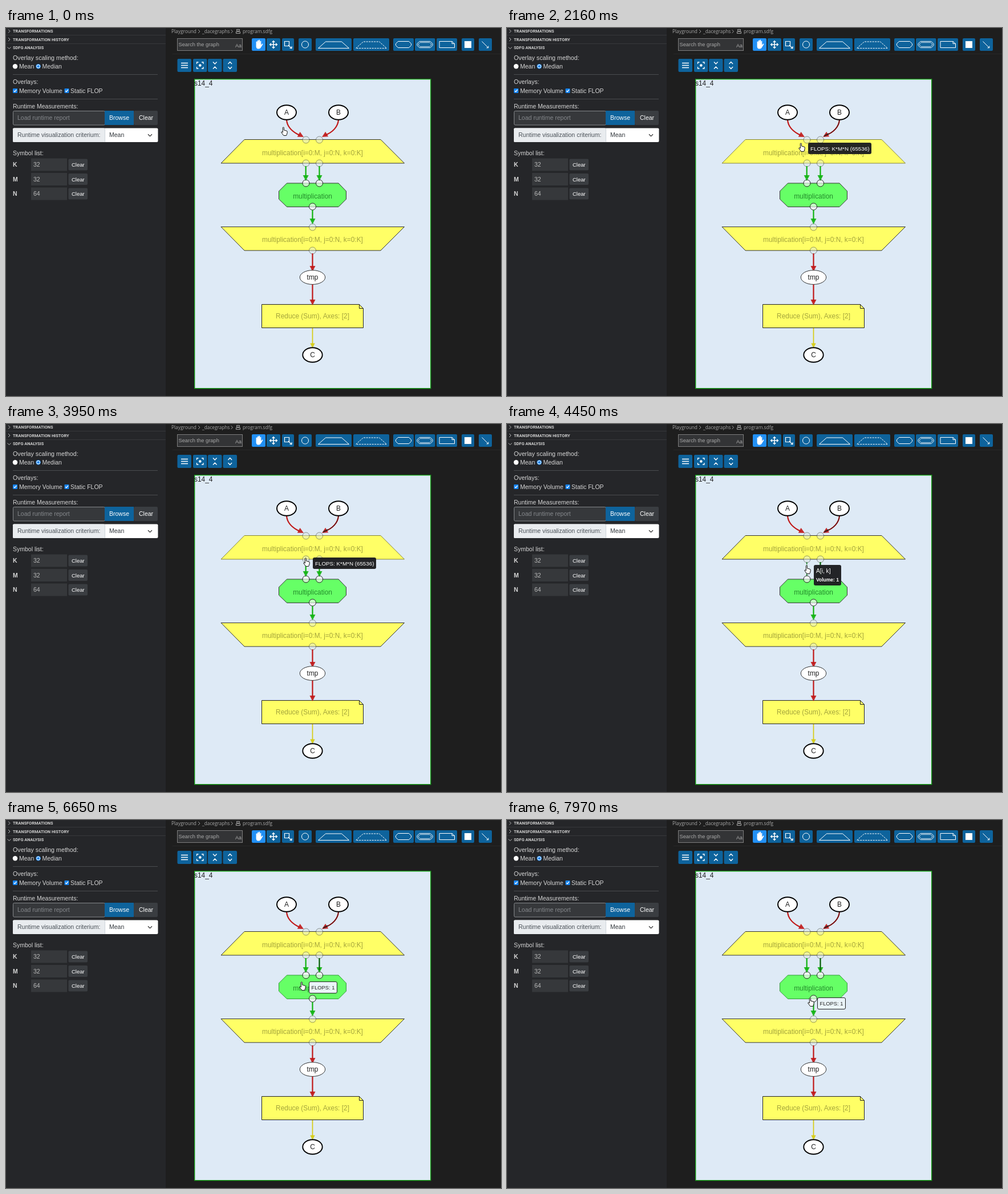
Recreate the animation shown at these times as an HTML page. Size 868 px wide and 645 px high, loop 8000 ms.

```html
<!DOCTYPE html>
<html lang="en">
<head>
<meta charset="utf-8">
<title>Graph overlay tooltips</title>
<style>
html, body { margin: 0; width: 100%; height: 100%; overflow: hidden; background: #1e1e1e; }
svg { display: block; font-family: "Liberation Sans", Arial, sans-serif; }
text { white-space: pre; }
</style>
</head>
<body>
<svg id="stage" width="868" height="645" viewBox="0 0 868 645"></svg>
<script>
const BLUE = '#0e639c', RED = '#c01717', GREEN = '#0fb30f', INK = '#333';

const rect = (x, y, w, h, fill, more = '') =>
  `<rect x="${x}" y="${y}" width="${w}" height="${h}" fill="${fill}" ${more}/>`;
const label = (x, y, s, size, fill, more = '') =>
  `<text x="${x}" y="${y}" font-size="${size}" fill="${fill}" ${more}>${s}</text>`;
const line = (d, color, width = 1, more = '') =>
  `<path d="${d}" fill="none" stroke="${color}" stroke-width="${width}" ${more}/>`;
const poly = (points, fill, stroke, more = '') =>
  `<polygon points="${points}" fill="${fill}" stroke="${stroke}" ${more}/>`;
const circle = (x, y, r, fill, more = '') =>
  `<circle cx="${x}" cy="${y}" r="${r}" fill="${fill}" ${more}/>`;
const mid = 'text-anchor="middle"';

function sidebar() {
  const light = '#d6d6d6', field = '#36383b', grey = '#3a3d41';
  const txt = (x, y, s, fill = light, size = 10.5) => label(x, y, s, size, fill);
  const head = (y, s) => label(12, y, s, 7.4, '#d0d0d0', 'font-weight="700" font-family="Roboto, sans-serif"');
  const check = x => rect(x, 106, 8, 8, '#1583f0', 'rx="1"') + line(`M${x + 1.8} 110l1.6 1.8 3-3.8`, '#fff', 1.3);
  let s = rect(0, 0, 280, 645, '#252629');
  s += head(8, 'TRANSFORMATIONS') + head(22.8, 'TRANSFORMATION HISTORY') + head(37.3, 'SDFG ANALYSIS');
  s += line('M4 2.5l3 3-3 3M4 17l3 3-3 3M2.5 33.5l3 3 3-3', '#ccc', .9);
  s += line('M0 12.5H280M0 27.5H280', '#3b3d40', .8);
  s += txt(12, 55.5, 'Overlay scaling method:', light, 10.7);
  s += circle(16, 67.2, 4.2, '#fff') + txt(23, 71.3, 'Mean');
  s += circle(56.6, 67.2, 4.2, '#1583f0') + circle(56.6, 67.2, 3.2, '#fff') + circle(56.6, 67.2, 2.3, '#1583f0') + txt(63.5, 71.3, 'Median');
  s += line('M12 81.5H266M12 124.5H266', '#4a4c4f');
  s += txt(12, 98, 'Overlays:') + check(12) + txt(23, 113.8, 'Memory Volume') + check(102.5) + txt(113, 113.8, 'Static FLOP');
  s += txt(12, 140.8, 'Runtime Measurements:');
  s += rect(12.5, 145.5, 161, 24.5, field, 'stroke="#85878a" rx="2"') + txt(20, 161, 'Load runtime report', '#85888c');
  s += rect(173, 145, 51, 25, BLUE) + txt(181, 161, 'Browse', '#fff');
  s += rect(224, 145, 42, 25, grey, 'rx="2"') + txt(233, 161, 'Clear', '#fff');
  s += rect(12, 175.5, 254.5, 24.5, '#fff', 'rx="2"') + rect(12, 175.5, 161, 24.5, '#e9ecef', 'rx="2"') + line('M173.5 176V200', '#ced4da');
  s += txt(20, 191.3, 'Runtime visualization criterium:', '#495057') + txt(181, 191.3, 'Mean', '#33383d');
  s += line('M249 186.2l3.5 3.4 3.5-3.4', '#333', 1.3);
  s += txt(12, 222.5, 'Symbol list:');
  [['K', 32], ['M', 32], ['N', 64]].forEach(([name, value], i) => {
    const y = 239.5 + i * 25.5;
    s += label(12, y + 3.5, name, 10.5, light, 'font-weight="700"');
    s += rect(44, y - 11, 63, 22, field) + txt(48, y + 3.7, value, '#bbb');
    s += rect(109.5, y - 10, 33.5, 20, grey, 'rx="2"') + txt(115, y + 3.5, 'Clear', '#fff', 9.5);
  });
  return s;
}

function toolbar() {
  const crumb = (x, s) => label(x, 9, s, 8.3, '#a9a9a9', 'font-family="Open Sans, sans-serif"');
  const button = (x, y, w, fill = BLUE) => rect(x, y, w, y > 50 ? 23 : 22, fill, 'rx="2"');
  const icon = (d, width = 1, more) => line(d, '#fff', width, more);
  let s = crumb(290, 'Playground') + crumb(344, '_dacegraphs') + crumb(415, 'program.sdfg');
  s += line('M337 3l3 3-3 3M394.500 3l3 3-3 3', '#a9a9a9', .9);
  s += line('M404.500 2.500h5v2.500h-5zM403.500 6.500h7v3h-7z', '#b5b5b5', .9);
  s += line('M292 45.5H868', '#2b2b2b', .8);
  s += rect(300.5, 18.5, 114, 21, '#333436', 'stroke="#7e7e7e"');
  s += label(302.5, 32, 'Search the graph', 9.3, '#a8a8a8') + label(402, 33.5, 'Aa', 9, '#a8a8a8');
  [[457, 24], [484, 21], [513, 23], [543, 63], [609, 63], [679, 36], [717, 35.5], [755, 36], [799, 22], [829, 23]]
    .forEach(([x, w]) => s += button(x, 18, w));
  s += button(431, 18, 24, '#2290f5');
  // open hand
  s += `<path d="M438.600 30v-6q1-1 1.800 0v4l.4-6q1-1 1.900 0v6l.4-7q1-1 1.900 0v7l.5-5q1-1 1.800 0l-.1 7 1.800-2.500q1.300-.4 1.500.8L447 34q-1.500 3-5 2.500-3-.2-3.400-4z" fill="#fff"/>`;
  s += icon('M463.500 29h11M469 23.500v11', 1.5);
  s += '<path d="M469 21.500l3 3.500h-6zM469 36.500l3-3.500h-6zM461.500 29l3.500-3v6zM476.500 29l-3.500-3v6z" fill="#fff"/>';
  s += icon('M488.500 23.500h8v8h-8zM495 30l6 6M497.500 35.500h3.500v-3.500', 1.2);
  s += circle(524.5, 29, 6, 'none', 'stroke="#fff"');
  const trap = x => `M${x} 35.500l13-11.500h28l13 11.500z`;
  s += icon(trap(547.5)) + icon(trap(613.5), 1, 'stroke-dasharray="3 1.5"');
  const octagon = (x, y, w, h, c) => `M${x + c} ${y}h${w - 2 * c}l${c} ${c}v${h - 2 * c}l${-c} ${c}h${2 * c - w}l${-c} ${-c}v${2 * c - h}z`;
  s += icon(octagon(683.5, 23.5, 27, 11, 4)) + icon(octagon(721, 23.5, 27, 11, 4)) + icon(octagon(723.5, 25.5, 22, 7, 2.5), .8);
  s += icon('M760 23.500h22l4.500 4v7h-26.500zM782 23.500v4h4.500');
  s += rect(804, 23, 12, 12, '#fff');
  s += icon('M834.500 23.500l11 11M845.800 31.500v3.300h-3.300', 1);
  [300.5, 328, 354, 380.5].forEach(x => s += button(x, 54, 24.5));
  s += icon('M307 61.5h12M307 65.5h12M307 69.500h12', 1.3);
  s += icon('M334.500 63v-3h3M343 60h3v3M346 68v3h-3M337.500 71h-3v-3', 1.3) + circle(340.3, 65.5, 2.3, '#fff');
  s += icon('M363 59.500l3.300 3.500 3.300-3.500M363 71.500l3.300-3.500 3.300 3.500M389.500 63l3.300-3.500 3.300 3.500M389.500 68l3.300 3.500 3.300-3.500', 1.3);
  return s;
}

// Arrowhead with its tip at x, y, pointing down before rotation.
const arrow = (x, y, color, turn = 0, size = 10) =>
  `<path d="M0 0l${-size / 2} ${-size}h${size}z" fill="${color}" fill-opacity=".9" transform="translate(${x} ${y})rotate(${turn})"/>`;
const drop = (x, y1, y2, color, width = 2.2, size = 10) =>
  line(`M${x} ${y1}V${y2 - 6}`, color, width) + arrow(x, y2, color, 0, size);

function graph() {
  const node = (x, y, rx, ry, name, width) =>
    `<ellipse cx="${x}" cy="${y}" rx="${rx}" ry="${ry}" fill="#fff" stroke="#000" stroke-width="${width}"/>` +
    label(x, y + 3.6, name, 11.9, '#222', mid);
  const port = (x, y, strong) => circle(x, y, 6, strong ? '#ffffffa0' : '#dce6e070',
    `stroke="${strong ? '#222' : '#00000060'}"`);
  const caption = (y, s, fill = '#a4a43c') => label(537.5, y, s, 11.9, fill, mid);
  const range = 'multiplication[i=0:M, j=0:N, k=0:K]';
  const curveA = 'M492 161C493 173 502 182 515 188', curveB = 'M583 161C582 173 573 183 559 188';

  let s = rect(330.7, 89.7, 414, 542, '#deeaf6', 'stroke="#169c16" stroke-width="1.4"');
  s += label(330, 101, 's14_4', 11.9, '#222');
  s += poly('418,195.500 657,195.500 698.500,237 377,237', '#ffff66', INK, 'id="entry"');
  s += poly('377,348.500 698.500,348.500 657,390 418,390', '#ffff66', INK);
  s += poly('492.500,272 583,272 596.500,286 596.500,300 583,313.500 492.500,313.500 478.500,300 478.500,286', '#66ff66', INK, 'id="tasklet"');
  s += poly('448.500,484.500 619.500,484.500 626.500,491.500 626.500,525.500 448.500,525.500', '#ffff66', '#222');
  s += line('M619.500 484.500v7h7', '#222');
  s += caption(222.5, range) + caption(375, range) + caption(508.5, 'Reduce (Sum), Axes: [2]');
  s += caption(299, 'multiplication', '#248c2c');
  for (const x of [526, 549.5]) s += port(x, 196) + port(x, 237) + port(x, 272, true);
  s += port(537.5, 313, true) + port(537.5, 349) + port(537.5, 390);

  s += `<g id="edgeA">${line(curveA, RED, 2.2)}${arrow(522, 191, RED, -62)}</g>`;
  s += `<g id="thinA">${line(curveA, '#a8412f', 1.7)}</g>`;
  s += line(curveB, RED, 2.2) + arrow(554, 191, RED, 60);
  s += `<g id="darkB">${line(curveB, '#4a1212', 1.1)}${line('M564 185l-8 4.500', '#222', 1.6)}</g>`;
  s += `<g id="edgeC">${drop(525.7, 242, 268, GREEN)}</g>`;
  s += `<g id="thinC">${line('M525.700 242V266', '#1b7a25', 1.6, 'stroke-dasharray="4 1"')}</g>`;
  s += drop(549.5, 242, 268, GREEN);
  s += `<g id="darkD">${line('M549.500 242V264', '#123f14', 1.4)}</g>`;
  s += drop(537.5, 319, 344, GREEN) + drop(537.5, 395, 427, RED) + drop(537.5, 449, 486, RED);
  s += drop(537.5, 526, 561, '#d6cc10', 1.7, 8.5);
  s += node(492, 148, 17, 12.8, 'A', 1.9) + node(583, 148, 17, 12.8, 'B', 1.9);
  s += node(537.5, 437, 22.2, 12.4, 'tmp', .8) + node(537.5, 573, 17.2, 12.8, 'C', 1.9);
  return s;
}

function tip(id, w, h, first, size, second, size2) {
  const small = h < 30;
  const body = id === 'tipOp'
    ? rect(.5, .5, w - 1, h - 1, '#eaf4f8', 'rx="2.500" stroke="#222"') + label(4.5, 14.3, first, size, '#222')
    : rect(0, 0, w, h, '#1d1e20', 'rx="3" fill-opacity=".97"') + label(4, small ? 13.8 : 13.6, first, size, '#fff');
  return `<g id="${id}">${body}${second ? label(4, 29.3, second, size2, '#fff', 'font-weight="700"') : ''}</g>`;
}

const pointer = `<path id="pointer" d="M3.300 1.500q1-1.300 2.100 0V6l4.600 1.200q1.400.5 1.300 2l-.4 2.800-1.300 3.500H4.900L.8 10q.1-1.500 1.500-1l1.100 1z" fill="#fff" stroke="#111" stroke-width="1"/>`;

document.getElementById('stage').innerHTML = rect(0, 0, 868, 645, '#1e1e1e') + sidebar() + toolbar() + graph() +
  tip('tipA', 71, 36, 'A[0:M, 0:K]', 10.1, 'Volume: K*M*N', 8.6) +
  tip('tipMap', 111, 20, 'FLOPS: K*M*N (65536)', 9.8) +
  tip('tipC', 48, 36, 'A[i, k]', 10.2, 'Volume: 1', 8.5) +
  tip('tipOp', 50, 21, 'FLOPS: 1', 9.3) + pointer;

// Pointer path: time, x, y
const path = [
  [0, 482, 173], [30, 482, 173], [420, 491, 173], [1040, 491, 173], [1100, 491, 172], [1460, 491, 172],
  [1760, 498, 183], [2260, 514, 205], [2590, 520, 223], [3540, 520, 223], [3610, 521, 224], [3750, 521, 224],
  [3950, 521, 234], [4550, 521, 249], [4580, 521, 249], [4670, 521, 251], [5680, 521, 251], [5770, 521, 252],
  [5940, 521, 252], [6740, 513, 287], [6770, 513, 287], [6810, 513, 288], [7310, 513, 288], [7970, 527, 311], [8000, 527, 311]
];
function pointerAt(t) {
  const i = path.findIndex(k => k[0] > t);
  const [t0, x0, y0] = path[i - 1], [t1, x1, y1] = path[i];
  const p = (t - t0) / (t1 - t0);
  return [Math.round(x0 + (x1 - x0) * p), Math.round(y0 + (y1 - y0) * p)];
}

const el = id => document.getElementById(id);
const show = (id, on) => el(id).setAttribute('visibility', on ? 'visible' : 'hidden');
const place = (id, x, y) => el(id).setAttribute('transform', `translate(${x} ${y})`);

function draw(t) {
  const [x, y] = pointerAt(t);
  const hover = t < 250 ? '' : t < 2050 ? 'A' : t < 4150 ? 'Map' : t < 6400 ? 'C' : 'Op';
  // The first tooltip trails the pointer while it moves.
  const [dx, dy] = hover === 'A' && t > 1460 ? [13, -5] : [17, 0];
  for (const id of ['A', 'Map', 'C', 'Op']) {
    show('tip' + id, id === hover);
    place('tip' + id, x + dx, y + dy);
  }
  place('pointer', x, y);
  for (const id of ['A', 'C']) {
    show('edge' + id, id !== hover);
    show('thin' + id, id === hover);
  }
  show('darkB', t >= 250);
  show('darkD', t >= 4150);
  el('entry').setAttribute('stroke', hover === 'Map' ? '#85853a' : INK);
  el('tasklet').setAttribute('stroke', hover === 'Op' ? '#2f9a36' : INK);
}

const start = performance.now();
function frame() {
  draw((performance.now() - start) % 8000);
  requestAnimationFrame(frame);
}
frame();
</script>
</body>
</html>
```
